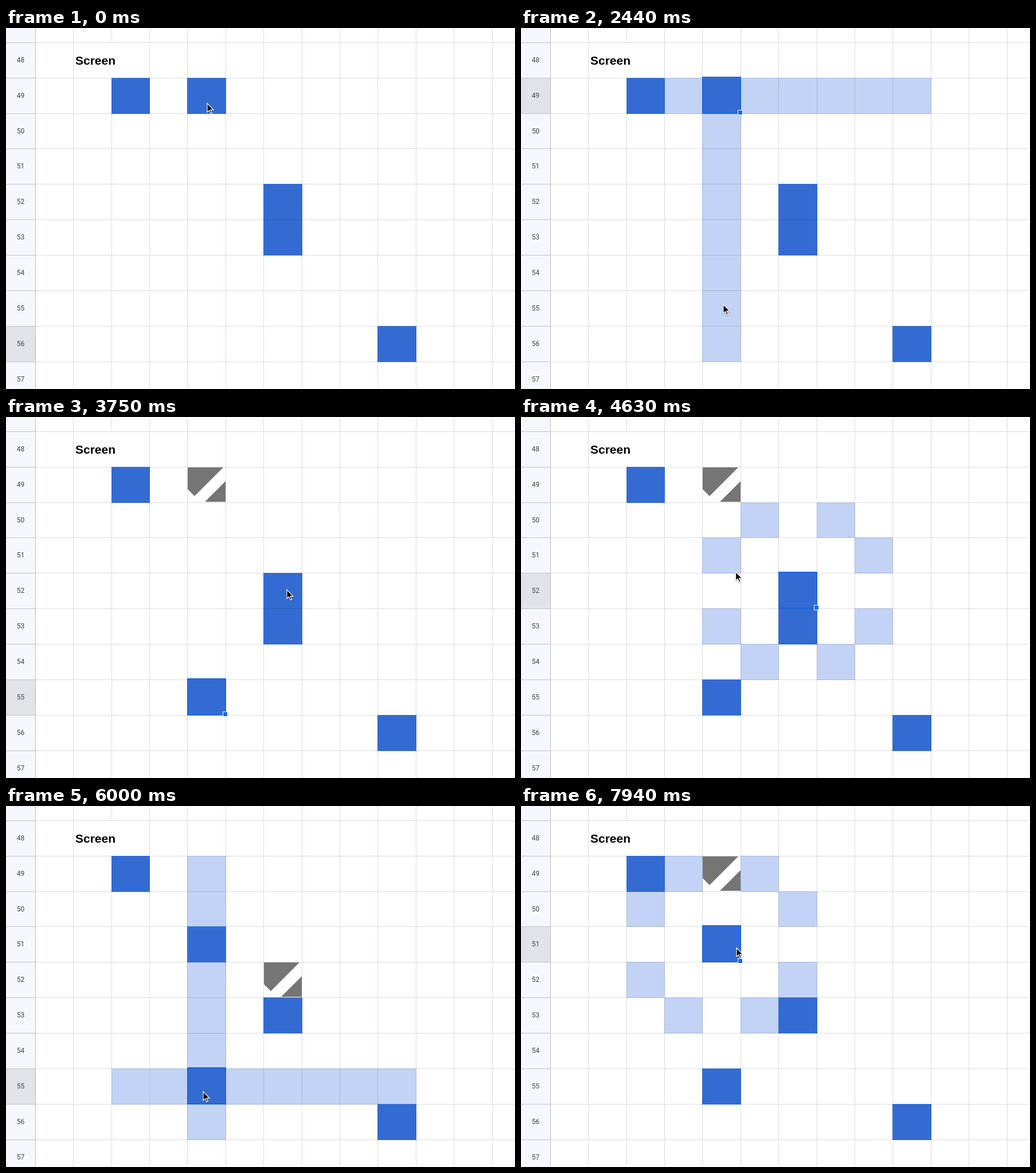
An HTML page for the animation above (8000 ms loop, 888 by 630 pixels).

```html
<!DOCTYPE html>
<html lang="en">
<head>
<meta charset="utf-8">
<title>Spreadsheet board</title>
<style>
  html, body { margin: 0; width: 100%; height: 100%; overflow: hidden; background: #fff; }
  svg { display: block; width: 888px; height: 630px; background: #fff; }
  .num { font: 12px Roboto, sans-serif; fill: #444; text-anchor: middle; }
  .title { font: bold 21px "Liberation Sans", Arial, sans-serif; fill: #000; }
  #lit { fill: #c3d3f5; mix-blend-mode: multiply; }
  #pieces { fill: #346bd2; }
  #seams { fill: #2d5db8; }
  #done { fill: #757575; }
  #border { fill: none; stroke: #1b66e0; stroke-width: 2; }
  #handle { fill: #1b66e0; stroke: #fff; }
  #pointer { fill: #000; stroke: #fff; stroke-width: 1.2; filter: drop-shadow(0 1px 1px #0005); }
</style>
</head>
<body>
<svg viewBox="0 0 888 630">
  <rect width="51" height="630" fill="#f6f7fc"/>
  <rect id="head" width="51" fill="#e2e3e8"/>
  <g id="grid" shape-rendering="crispEdges"></g>
  <g shape-rendering="crispEdges">
    <path id="lit"/><path id="pieces"/><path id="seams"/>
  </g>
  <path id="done"/>
  <g id="sel"><rect id="border"/><rect id="handle" width="8" height="8"/></g>
  <g id="labels"><text class="title" x="121" y="64">Screen</text></g>
  <path id="pointer" d="M1 1.6V17L4.6 13.7 7 19.4 9.4 18.4 7 12.9H12Z"/>
</svg>
<script>
const LOOP = 8000, STEP = 62.5;
const $ = id => document.getElementById(id);
const set = (el, attrs) => { for (const k in attrs) el.setAttribute(k, attrs[k]); };
function add(parent, tag, attrs) {
  const el = document.createElementNS("http://www.w3.org/2000/svg", tag);
  set(el, attrs);
  parent.append(el);
  return el;
}

// Column 1 and row 49 are the first cells of the 8 x 8 board.
const colX = c => Math.round(117.2 + 66.4 * c);
const rowY = r => Math.round(24.7 + 61.93 * (r - 48));

function drawSheet() {
  const bar = (x, y, width, height, fill) => add($("grid"), "rect", { x, y, width, height, fill });
  for (let c = 0; c < 12; c++) {
    if (c === 1) {
      // the title runs over this line in row 48
      bar(colX(c), 0, 1, 25, "#dcdcdc");
      bar(colX(c), 87, 1, 543, "#dcdcdc");
    } else bar(colX(c), 0, 1, 630, "#dcdcdc");
  }
  for (let r = 48; r < 58; r++) {
    bar(52, rowY(r), 836, 1, "#dcdcdc");
    bar(0, rowY(r), 51, 1, "#c2c2c2");
    add($("labels"), "text", { class: "num", x: 25.4, y: rowY(r) + 34.6 }).textContent = r;
  }
  bar(51, 0, 1, 630, "#bdbdbd");
}

const rook = ([c, r], x, y) => (c === x) !== (r === y);
const knight = ([c, r], x, y) => Math.abs((c - x) * (r - y)) === 2;
const rookBelow = (s, x, y) => rook(s, x, y) && y > 50;

const start = [[1, 49], [3, 49], [5, 52], [5, 53], [8, 56]];
const second = [[1, 49], [3, 55], [5, 52], [5, 53], [8, 56]];
const third = [[1, 49], [3, 55], [3, 51], [5, 53], [8, 56]];
const oneDone = [[3, 49]], twoDone = [[3, 49], [5, 52]];

// at, pieces, ticked cells, selected cell, move rule
const states = [
  [0, start, [], null, null],
  [15, start, [], [3, 49], rook],
  [42, second, oneDone, [3, 55], null],
  [61, second, oneDone, [5, 52], knight],
  [79, third, twoDone, [3, 51], null],
  [96, third, twoDone, [3, 55], rook],
  [103, third, twoDone, [3, 55], rookBelow],
  [121, third, twoDone, [3, 51], knight]
];
const clicks = [15, 42, 61, 79, 96, 121];

const box = ([c, r]) =>
  `M${colX(c)} ${rowY(r)}H${colX(c + 1) + 1}V${rowY(r + 1) + 1}H${colX(c)}Z`;
const tick = ([c, r]) => {
  const x = colX(c), y = rowY(r);
  return `M${x + 1} ${y + 1}h62l-50 50l-12 -12zM${x + 67} ${y + 25}v36h-36z`;
};
const has = (list, [c, r]) => list.some(p => p[0] === c && p[1] === r);
const join = (list, shape) => list.map(shape).join("");

function drawBoard([, pieces, done, sel, rule]) {
  const lit = [];
  if (rule)
    for (let r = 49; r < 57; r++)
      for (let c = 1; c < 9; c++)
        if (rule(sel, c, r) && !has(pieces, [c, r])) lit.push([c, r]);

  set($("lit"), { d: join(lit, box) });
  set($("pieces"), { d: join(pieces, box) });
  set($("seams"), {
    d: join(pieces.filter(([c, r]) => has(pieces, [c, r - 1])),
      ([c, r]) => `M${colX(c)} ${rowY(r)}H${colX(c + 1) + 1}v1H${colX(c)}Z`)
  });
  set($("done"), { d: join(done.filter(p => !has(lit, p)), tick) });

  const row = sel ? sel[1] : 56;
  set($("head"), { y: rowY(row), height: rowY(row + 1) - rowY(row) });
  $("sel").style.display = sel ? "" : "none";
  if (sel) {
    const x = colX(sel[0]) + 1, y = rowY(row) - 1;
    const right = colX(sel[0] + 1), bottom = rowY(row + 1);
    set($("border"), { x, y, width: right - x, height: bottom - y - 0.5 });
    set($("handle"), { x: right - 4.5, y: bottom - 5.5 });
  }
}

const linear = p => p;
const smooth = p => p * p * (3 - 2 * p);
const easeOut = p => 1 - (1 - p) ** 2;

// step, x, y, easing on the way there
const path = [
  [0, 350, 130], [20, 350, 130], [22, 351, 146], [23, 352, 165], [24, 352, 165],
  [28, 347, 288], [33, 352, 428], [39, 352, 481, easeOut],
  [48, 352, 481], [60, 489, 300, smooth],
  [69, 489, 300], [76, 345, 261, smooth],
  [84, 345, 261], [85, 345, 306], [94, 343, 497, easeOut],
  [109, 343, 497], [110, 343, 494], [118, 358, 246, smooth],
  [126, 358, 246], [127, 375, 246], [128, 375, 246]
];

function pointerAt(n) {
  const i = path.findIndex(k => k[0] > n);
  const [n0, x0, y0] = path[i - 1], [n1, x1, y1, ease = linear] = path[i];
  const p = ease((n - n0) / (n1 - n0));
  return [x0 + (x1 - x0) * p, y0 + (y1 - y0) * p];
}

let shown;
function render(time) {
  const n = Math.floor((time % LOOP + 2.5) / STEP) % 128;
  const state = states.filter(s => s[0] <= n).pop();
  if (state !== shown) drawBoard(shown = state);
  // the fill handle follows the border one step later
  $("handle").style.display = clicks.includes(n) ? "none" : "";
  set($("pointer"), { transform: `translate(${pointerAt(n)})` });
}

drawSheet();
const t0 = performance.now();
function loop() {
  render(performance.now() - t0);
  requestAnimationFrame(loop);
}
loop();
</script>
</body>
</html>
```
